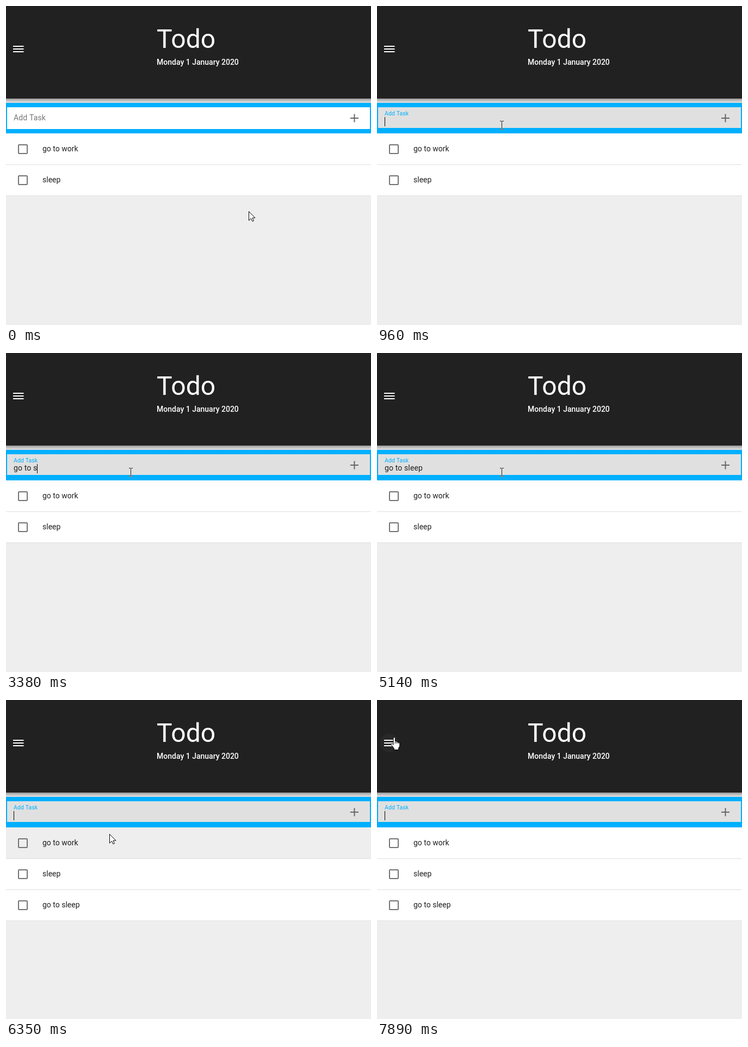
An HTML page with a canvas that plays this animation: 671 by 586 pixels, repeating every 7.99 s.

```html
<!DOCTYPE html>
<html lang="en">
<head>
<meta charset="utf-8">
<title>Todo</title>
<style>
  html, body { margin: 0; width: 100%; height: 100%; overflow: hidden; background: #eee; }
  canvas { display: block; }
</style>
</head>
<body>
<canvas id="stage" width="671" height="586"></canvas>
<script>
const W = 671, H = 586, LOOP = 7990;
const BLUE = '#00b0ff', INK = 'rgba(0,0,0,.87)';
const ROW_TOP = 234, ROW_H = 57;
const FOCUS = 640, SUBMIT = 5260;
const ctx = document.getElementById('stage').getContext('2d', { alpha: false });

// [time, text, caret visible]
const typing = [
  [0, '', 0], [FOCUS, '', 1], [1080, '', 0], [1630, '', 1], [2160, '', 0],
  [2500, 'g', 1], [2610, 'go', 1], [2720, 'go ', 1], [2940, 'go t', 1],
  [3060, 'go to ', 1], [3380, 'go to s', 1], [3930, 'go to s', 0],
  [4050, 'go to sle', 1], [4370, 'go to slee', 1], [4590, 'go to sleep', 1],
  [5140, 'go to sleep', 0], [SUBMIT, '', 1], [5790, '', 0],
  [6350, '', 1], [6900, '', 0], [7430, '', 1]
];

// [time, pointer shape, x, y]
const pointer = [
  [0, 'arrow', 446, 377], [100, 'arrow', 440, 372], [210, 'arrow', 395, 338],
  [320, 'arrow', 320, 283], [430, 'arrow', 255, 238], [530, 'beam', 229, 218],
  [640, 'beam', 229, 218],
  [6240, 'arrow', 219, 227], [6350, 'arrow', 190, 246], [6460, 'arrow', 150, 272],
  [6570, 'arrow', 110, 296], [6680, 'arrow', 76, 318], [6790, 'arrow', 50, 341],
  [6900, 'hand', 31, 366], [6990, 'hand', 30, 367], [7110, 'hand', 32, 377],
  [7220, 'none', 0, 0], [7320, 'none', 0, 0],
  [7670, 'hand', 28, 86], [7780, 'hand', 26, 72], [7890, 'hand', 25, 68]
];

const arrowPath = new Path2D('M.5 .5V17L4.4 13.2L7 18.6L9.4 17.6L7 12.2H12Z');
const handPath = new Path2D(
  'M5 14V2.5Q5 .5 6.7 .5T8.5 2.5V8Q11 7 11.4 9Q13.8 8 14.2 10Q16.6 9.6 16.8 12' +
  'V16.5L14.6 20.5V23.5H6.4V21L1 14Q0 11.5 2.4 11.6Z');

function indexAt(list, t) {
  let i = 0;
  while (i + 1 < list.length && list[i + 1][0] <= t) i++;
  return i;
}

function rect(color, x, y, w, h) {
  ctx.fillStyle = color;
  ctx.fillRect(x, y, w, h);
}

function text(str, x, y, size, color, weight = 400, spacing = 0) {
  ctx.font = `${weight} ${size}px Roboto, sans-serif`;
  ctx.letterSpacing = spacing + 'px';
  ctx.fillStyle = color;
  ctx.fillText(str, x, y);
}

function drawHeader(menuHover) {
  const shade = ctx.createLinearGradient(0, 170, 0, 179);
  shade.addColorStop(0, 'rgba(0,0,0,.36)');
  shade.addColorStop(.5, 'rgba(0,0,0,.16)');
  shade.addColorStop(1, 'rgba(0,0,0,.03)');
  rect(shade, 0, 170, W, 9);
  rect('#212121', 0, 0, W, 170);
  if (menuHover) {
    ctx.fillStyle = 'rgba(255,255,255,.03)';
    ctx.beginPath();
    ctx.arc(22, 79, 17, 0, 7);
    ctx.fill();
  }
  for (const y of [73, 78, 83]) rect('#fff', 13, y, 19.5, 2);
  text('Todo', 277, 77, 48, '#fff');
  text('Monday 1 January 2020', 277, 108, 14, '#fff', 500);
}

function drawField(t) {
  // 0 = resting placeholder, 1 = floated label
  const p = t < FOCUS ? 0 : t < 740 ? .435 : 1;
  const fill = p === 1 ? '#e0e0e0' : p ? '#e9e9e9' : t >= 530 ? '#f5f5f5' : '#fff';
  rect(BLUE, 0, 178, W, 56);
  rect(fill, 2, 186, 667, 40);
  rect(BLUE, 335.5 - 333.5 * p, 224, 667 * p, 2);

  const size = 14 - 3.5 * p;
  const color = p === 0 ? 'rgba(0,0,0,.54)' : p < 1 ? '#25b8fb' : BLUE;
  text('Add Task', 14, 210 - 9 * p, size, color, p > 0 && p < 1 ? 500 : 400, size * .0094);

  const [, value, caret] = typing[indexAt(typing, t)];
  text(value, 14, 216, 14, INK, 400, .13);
  if (caret) rect('#000', Math.floor(14 + ctx.measureText(value).width), 204, 1, 17);

  rect('#666', 633, 205, 15, 2);
  rect('#666', 639.5, 198.5, 2, 15);
}

function rowUnder(step) {
  if (!step || step[1] === 'none') return -1;
  return Math.floor((step[3] - ROW_TOP) / ROW_H);
}

function drawRows(t, i) {
  const tasks = ['go to work', 'sleep'];
  if (t >= SUBMIT) tasks.push('go to sleep');
  const now = rowUnder(pointer[i]), before = rowUnder(pointer[i - 1]);
  tasks.forEach((task, n) => {
    const y = ROW_TOP + n * ROW_H;
    rect(n === now ? '#eee' : n === before ? '#fcfcfc' : '#fff', 0, y, W, ROW_H);
    rect('#e0e0e0', 0, y + ROW_H, W, 1);
    ctx.strokeStyle = '#737373';
    ctx.lineWidth = 2;
    ctx.beginPath();
    ctx.roundRect(23, y + 21, 16, 16, 1);
    ctx.stroke();
    text(task, 67, y + 33, 14, INK);
  });
  // keep every divider above the row that follows it
  tasks.forEach((_, n) => rect('#e0e0e0', 0, ROW_TOP + (n + 1) * ROW_H, W, 1));
}

function drawPointer([, shape, x, y]) {
  if (shape === 'none') return;
  ctx.save();
  ctx.translate(x, y);
  if (shape === 'beam') {
    ctx.globalCompositeOperation = 'difference';
    for (const end of [-7, 8]) {
      rect('#fff', -3, end, 3, 1);
      rect('#fff', 1, end, 3, 1);
    }
    rect('#fff', 0, -6, 1, 14);
  } else {
    const path = shape === 'hand' ? handPath : arrowPath;
    ctx.fillStyle = '#fff';
    ctx.strokeStyle = '#000';
    ctx.lineWidth = 1;
    ctx.fill(path);
    ctx.stroke(path);
    if (shape === 'hand') {
      for (const k of [8.5, 11.4, 14.2]) rect('#000', k - .5, 9, 1, 3);
    }
  }
  ctx.restore();
}

function draw(t) {
  const i = indexAt(pointer, t);
  rect('#eee', 0, 0, W, H);
  drawHeader(t >= 7670);
  drawField(t);
  drawRows(t, i);
  drawPointer(pointer[i]);
}

const start = performance.now();
function tick() {
  draw((performance.now() - start) % LOOP);
  requestAnimationFrame(tick);
}
tick();
</script>
</body>
</html>
```
